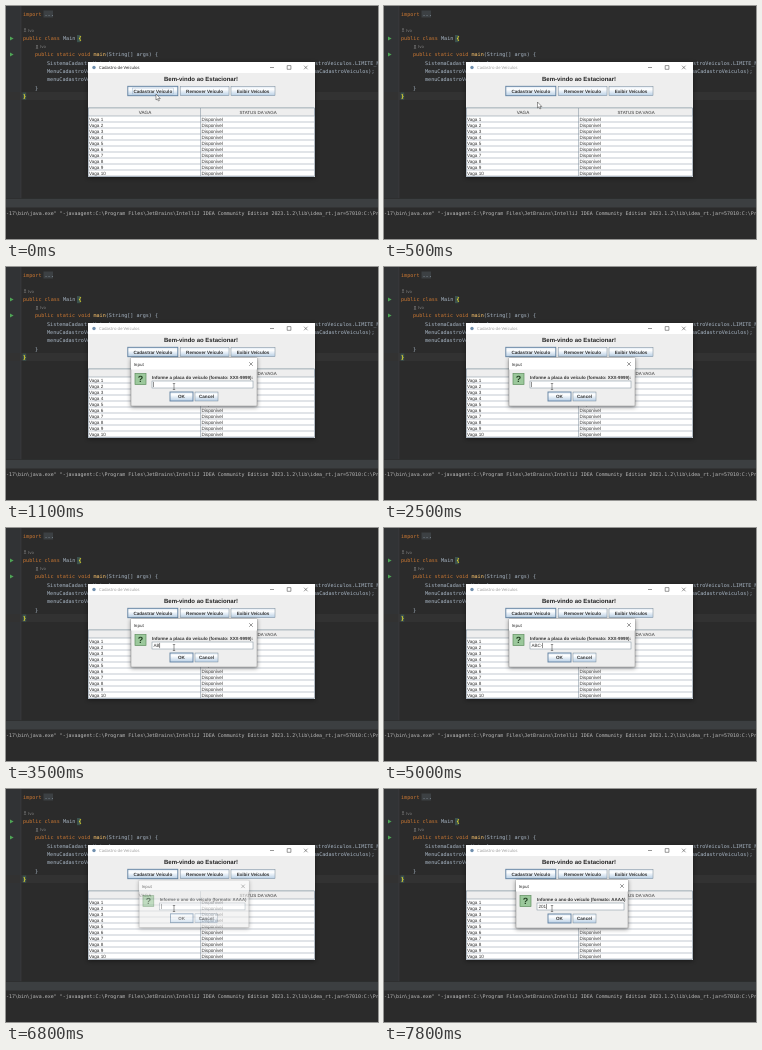
Animation, 372 px wide and 233 px high, one loop 8 s. Source, as an HTML page:

```html
<!DOCTYPE html>
<html lang="pt">
<head>
<meta charset="utf-8">
<title>Cadastro de Veículos</title>
<style>
html, body { margin: 0; width: 100%; height: 100%; overflow: hidden; background: #2b2b2b; }
svg { display: block; width: 100vw; height: 100vh; }
text { white-space: pre; text-rendering: geometricPrecision; }
.code { font: 5.12px "DejaVu Sans Mono", monospace; fill: #a9b7c6; }
.log { font: 4.97px "DejaVu Sans Mono", monospace; fill: #bbb; }
.hint { font: 4.2px Inter, sans-serif; fill: #808080; }
.ui { font: 4.6px "Liberation Sans", Arial, sans-serif; fill: #333; }
.bold { font: bold 4.6px "Liberation Sans", Arial, sans-serif; fill: #333; }
.msg { font-size: 4.45px; }
.head { font-size: 6px; fill: #222; }
.title { font: 4.2px "Open Sans", sans-serif; fill: #111; }
.kw { fill: #cc7832; }
.fn { fill: #ffc66d; }
.brace { fill: #ffef28; font-weight: bold; }
.window { filter: drop-shadow(0 1px 2px rgba(0, 0, 0, .45)); }
</style>
</head>
<body>
<svg id="stage" viewBox="0 0 372 233"></svg>
<script>
const stage = document.getElementById('stage');
const rect = (x, y, w, h, fill, more = '') =>
  `<rect x="${x}" y="${y}" width="${w}" height="${h}" fill="${fill}" ${more}/>`;
const text = (x, y, s, cls, more = '') =>
  `<text x="${x}" y="${y}" class="${cls}" ${more}>${s}</text>`;
const path = (d, stroke, width = .5, fill = 'none') =>
  `<path d="${d}" stroke="${stroke}" stroke-width="${width}" fill="${fill}"/>`;
const span = (cls, s) => `<tspan class="${cls}">${s}</tspan>`;
const middle = 'text-anchor="middle"';
const edge = 'stroke="#7a8a99" stroke-width=".5"';

function button(x, y, w, h, label, strong) {
  const line = strong ? 'stroke="#5f7f9f" stroke-width=".9"' : edge;
  return rect(x, y, w, h, 'url(#metal)', line) +
    text(x + w / 2, y + h / 2 + 1.65, label, 'bold', middle);
}

const cross = (x, y) =>
  path(`M${x - 1.8} ${y - 1.8}l3.6 3.6m0 -3.6l-3.6 3.6`, '#333', .5);

function hint(x, y) {
  return `<circle cx="${x}" cy="${y - 2.5}" r=".8" fill="#808080"/>` +
    path(`M${x - 1.3} ${y}q1.3 -2.4 2.6 0z`, 'none', 0, '#808080') +
    text(x + 3, y, 'Ivo', 'hint');
}

function editor() {
  const run = y => path(`M4 ${y - 2}l3.6 2l-3.6 2z`, 'none', 0, '#4fa556');
  return rect(0, 0, 372, 233, '#2b2b2b') +
    rect(0, 0, 15, 193, '#313335') +
    rect(0, 86, 372, 8, '#323232') +
    rect(14.8, 0, .4, 193, '#46494b') +
    run(32.5) + run(48.5) +
    rect(37.5, 4.5, 9.5, 7, '#3c4043') +
    text(17, 9.8, span('kw', 'import') + ' ...', 'code') +
    hint(19, 25.6) +
    rect(71, 29, 3.6, 7.2, '#3b514d') +
    text(17, 34.3, span('kw', 'public class') + ' Main ' + span('brace', '{'), 'code') +
    hint(31, 42.4) +
    text(29, 50.3, span('kw', 'public static void') + span('fn', ' main') + '(String[] args) {', 'code') +
    text(41, 59, 'SistemaCadastroVeiculos', 'code') +
    text(309, 59, 'stroVeiculos.LIMITE_MAXIMO', 'code') +
    text(41, 67.2, 'MenuCadastroVeiculos', 'code') +
    text(307, 67.2, 'maCadastroVeiculos);', 'code') +
    text(41, 75.4, 'menuCadastroVeiculos', 'code') +
    text(29, 83.6, '}', 'code') +
    rect(16.6, 86.5, 3.6, 7.2, '#3b514d') +
    text(17, 91.8, span('brace', '}'), 'code') +
    rect(0, 192.5, 372, 9, '#3c3f41') +
    rect(0, 192.2, 372, .6, '#292a2b') +
    text(0, 208.6, '-17\\bin\\java.exe" "-javaagent:C:\\Program Files\\JetBrains\\IntelliJ IDEA Community Edition 2023.1.2\\lib\\idea_rt.jar=57010:C:\\Program', 'log');
}

function mainWindow() {
  let s = rect(82, 56, 227, 115, '#eee') + rect(82, 56, 227, 11, '#fff') +
    '<circle cx="88" cy="61.5" r="1.7" fill="#6f8fae"/>' +
    text(93, 63.1, 'Cadastro de Veículos', 'title', 'id="caption"') +
    path('M264 61.5h4M281.2 59.6h3.7v3.7h-3.7z', '#333') + cross(299.8, 61.5) +
    text(195, 74.6, 'Bem-vindo ao Estacionar!', 'bold head', middle) +
    button(121.8, 80.3, 50, 9.4, 'Cadastrar Veículo', true) +
    rect(126.2, 82, 41.2, 6, 'none', 'id="focus" stroke="#8faac6" stroke-width=".4"') +
    button(174.2, 80.3, 48.8, 9.4, 'Remover Veículo') +
    button(225, 80.3, 44, 9.4, 'Exibir Veículos') +
    rect(82.3, 102, 226, 68.3, '#fff', edge) +
    rect(82.3, 102, 226, 8, '#eee', edge) +
    text(139, 107.6, 'VAGA', 'ui', middle) +
    text(252, 107.6, 'STATUS DA VAGA', 'ui msg', middle);
  for (let i = 0; i < 10; i++) {
    const y = 110 + i * 6;
    s += text(83, y + 4.6, 'Vaga ' + (i + 1), 'ui') +
      text(195.5, y + 4.6, 'Disponível', 'ui') +
      path(`M82.3 ${y + 6}h226`, '#7a8a99', .45);
  }
  return `<g class="window">${s + path('M194.5 102v68', '#7a8a99')}</g>`;
}

function dialog(id, x, w, message) {
  return `<g id="${id}" class="window">` +
    rect(x, 91, w, 48, '#eee', 'stroke="#777" stroke-width=".4"') +
    rect(x, 91, w, 11.5, '#fff') +
    text(x + 2.7, 98.6, 'Input', 'title') + cross(x + w - 6, 97) +
    rect(x + 4, 106.5, 11, 11, '#9bc89b', 'stroke="#5f8f5f" stroke-width=".7"') +
    text(x + 9.5, 115.2, '?', 'bold', middle + ' style="font-size:9px;fill:#234023"') +
    text(x + 21, 111.6, message, 'bold msg') +
    rect(x + 21, 114, w - 25, 7, '#fff', edge) +
    text(x + 22.4, 119.2, '', 'ui', 'data-field') +
    rect(0, 114.9, .5, 5.2, '#222', 'data-caret') +
    button(164, 125, 23, 9, 'OK', true) + button(189, 125, 23, 9, 'Cancel') + '</g>';
}

stage.innerHTML =
  `<defs><linearGradient id="metal" x2="0" y2="1">
    <stop offset="0" stop-color="#dde8f3"/><stop offset=".3" stop-color="#fff"/>
    <stop offset="1" stop-color="#b8cfe5"/></linearGradient></defs>` +
  editor() + mainWindow() +
  dialog('plate', 125, 126, 'Informe a placa do veículo (formato: XXX-9999):') +
  dialog('year', 132, 112, 'Informe o ano do veículo (formato: AAAA)') +
  `<g id="arrow">${path('M0 0v6l1.4 -1.2l1 2.2l1 -.5l-1 -2h1.9z', '#222', .45, '#fff')}</g>` +
  `<g id="beam">${path('M-1.2 -3h2.4m-1.2 0v6m-1.2 0h2.4', '#333', .5)}</g>`;

const get = id => document.getElementById(id);
const ramp = (t, a, b) => Math.min(1, Math.max(0, (t - a) / (b - a)));
const show = (el, on) => el.setAttribute('visibility', on ? 'visible' : 'hidden');

// Times at which each further character appears, after the opening time.
const forms = [
  { el: get('plate'), x: 147.4, value: 'ABC-1234', keys: [1100, 2600, 3500, 3700, 4900, 5200, 5400, 6300, 6500],
    open: [500, 800], close: [6600, 6750] },
  { el: get('year'), x: 154.4, value: '201', keys: [6800, 7500, 7600, 7800],
    open: [6650, 6950], close: [9000, 9100] }
];

function drawForm(f, t) {
  const shown = 1 - (1 - ramp(t, ...f.open)) ** 1.4;
  const alpha = shown * (1 - ramp(t, ...f.close));
  const scale = .95 + .05 * shown;
  f.el.style.display = alpha ? '' : 'none';
  if (!alpha) return;
  f.el.setAttribute('opacity', alpha);
  f.el.setAttribute('transform', `translate(188 115) scale(${scale}) translate(-188 -115)`);
  const count = f.keys.filter(k => k <= t).length - 1;
  const field = f.el.querySelector('[data-field]');
  const caret = f.el.querySelector('[data-caret]');
  field.textContent = f.value.slice(0, Math.max(0, count));
  const width = count > 0 ? field.getComputedTextLength() : 0;
  caret.setAttribute('x', f.x + width);
  caret.style.display = count >= 0 && (t - f.keys[count]) % 1000 < 500 ? '' : 'none';
}

function draw(t) {
  const active = t < 400;
  get('caption').style.fill = active ? '#111' : '#999';
  show(get('focus'), active);
  forms.forEach(f => drawForm(f, t));
  const a = ramp(t, 200, 500), b = ramp(t, 500, 1000);
  const x = 150 + 3.5 * a + 14.5 * b, y = 88 + 8 * a + 23.5 * b;
  get('arrow').setAttribute('transform', `translate(${x} ${y})`);
  get('beam').setAttribute('transform', `translate(${x} ${y})`);
  show(get('arrow'), t < 1000);
  show(get('beam'), t >= 1000);
}

const start = performance.now();
function tick() {
  const t = (performance.now() - start) % 8000;
  draw(Math.floor(t / 100) * 100);
  requestAnimationFrame(tick);
}
tick();
</script>
</body>
</html>
```
